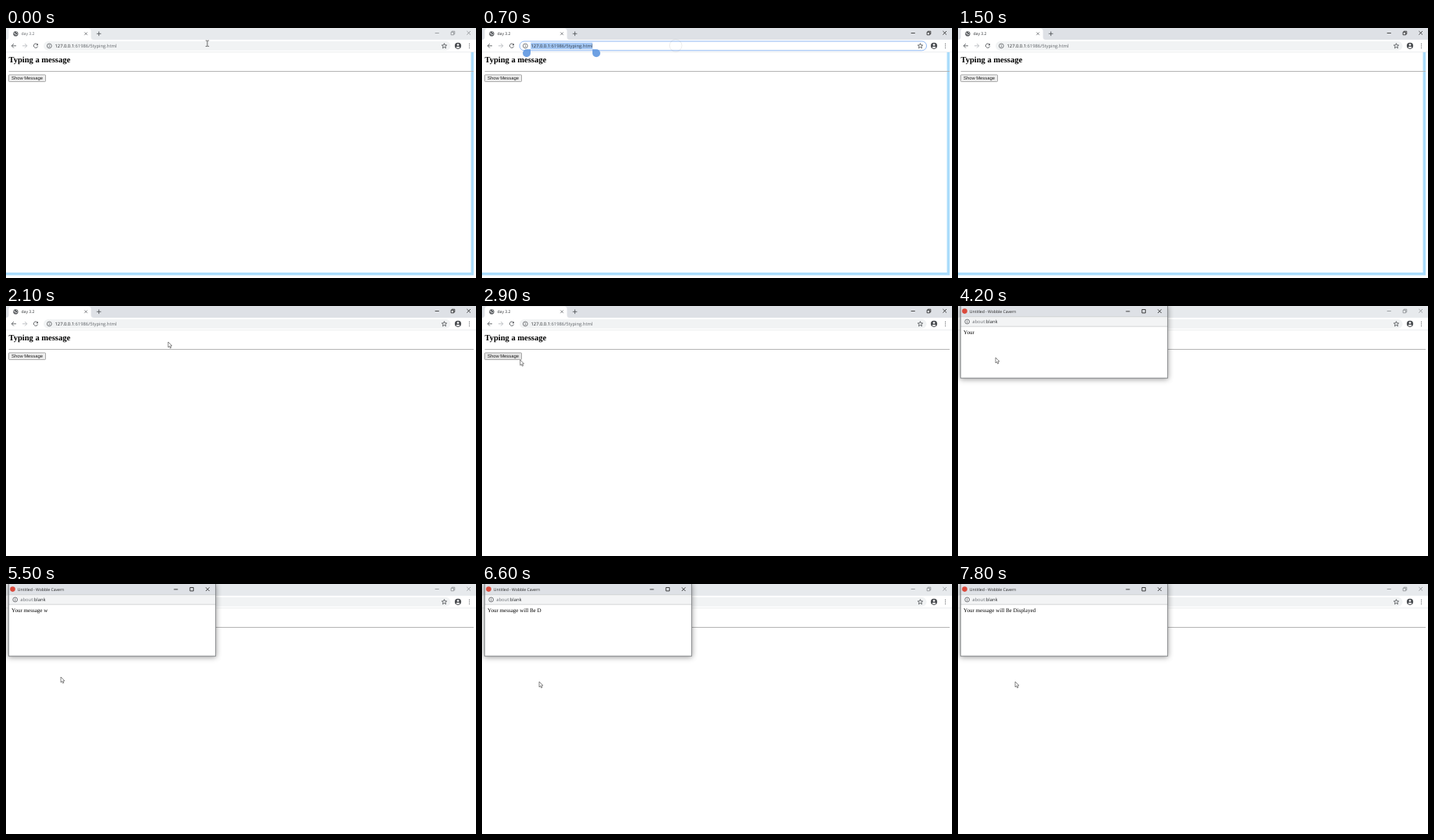
An HTML page for the animation above (8 s loop, 600 by 320 pixels).

```html
<!DOCTYPE html>
<html lang="en">
<head>
<meta charset="utf-8">
<title>Typing a message</title>
<style>
  html, body { margin: 0; width: 100%; height: 100%; overflow: hidden; background: #fff; }
  svg { display: block; width: 600px; height: 320px; text-rendering: geometricPrecision; }
  .ui { font-family: "Open Sans", "Noto Sans", sans-serif; font-size: 5.1px; }
  .url { font-size: 5.8px; }
  .serif { font-family: "Liberation Serif", serif; font-size: 7.05px; }
  .btn { font-family: "Liberation Sans", sans-serif; font-size: 5.85px; }
  .line { fill: none; stroke: #505357; stroke-width: .85; }
  #popup { transform-box: view-box; transform-origin: 135.5px 46px; filter: drop-shadow(0 1.5px 3.5px rgba(0,0,0,.42)); }
</style>
</head>
<body>
<svg viewBox="0 0 600 320">
  <defs>
    <g id="info" class="line">
      <circle r="2.9" stroke-width=".75"/>
      <path d="M0-.4V1.6M0-1.6V-.9" stroke-width=".8"/>
    </g>
    <path id="cross" d="M-2.3-2.3 2.3 2.3M2.3-2.3-2.3 2.3"/>
  </defs>

  <rect width="600" height="320" fill="#fff"/>
  <rect id="strip" width="600" height="15"/>
  <path d="M0 15Q3.5 15 3.5 11.5V4Q3.5 .5 7 .5H105Q108.5 .5 108.5 4V11.5Q108.5 15 112 15Z" fill="#fff"/>
  <circle cx="12.4" cy="7.4" r="3.1" fill="#505357"/>
  <path d="M10 6.4 12 7.2 11.8 9.2M12.900 5.200 14.400 6.400M13 8.900 14.500 7.900" fill="none" stroke="#fff" stroke-width=".9"/>
  <text id="tab" class="ui" x="19.5" y="9.3">day 3.2</text>
  <use href="#cross" class="line" transform="translate(102 7.3) scale(.8)"/>
  <path class="line" d="M115.8 7.3H121.4M118.6 4.5V10.1"/>
  <g id="controls" fill="none" stroke-width=".8">
    <path d="M547.7 6.5H552.800M568.1 5.3H571.600V8.800H568.100ZM569.100 5.300V4.200H572.800V7.800H571.600"/>
    <use href="#cross" x="590.7" y="6.3"/>
  </g>

  <path d="M0 30.8H600" stroke="#e3e5e8" stroke-width=".7"/>
  <g class="line">
    <path d="M13 22.8H7.3M9.9 20.1 7.2 22.8 9.9 25.5"/>
    <path d="M21 22.8H26.7M24.1 20.1 26.8 22.8 24.1 25.5" stroke="#b4b7bb"/>
    <path d="M40.3 21.2A2.7 2.7 0 1 0 40.6 23.5"/>
    <path d="M40.9 19.7V22.2H38.4Z" fill="#505357" stroke="none"/>
  </g>
  <rect id="omnibox" x="48" y="17" width="519.5" height="11.8" rx="5.9"/>
  <rect id="selection" x="62.3" y="18.7" width="78.8" height="8.6" fill="#a3c7f5"/>
  <use href="#info" x="55.3" y="22.9"/>
  <text class="ui url" x="62.5" y="25" fill="#25282b">127.0.0.1<tspan id="path">:61986/5typing.html</tspan></text>
  <path class="line" stroke-width=".7" d="M559.5 19.7 560.4 21.9 562.7 22 560.9 23.5 561.5 25.8 559.5 24.5 557.5 25.8 558.1 23.5 556.3 22 558.6 21.9Z"/>
  <circle cx="577" cy="22.8" r="4.1" fill="#4a4d51"/>
  <circle cx="577" cy="21.5" r="1.3" fill="#fff"/>
  <path d="M574.4 24.9Q577 22.5 579.6 24.9Q577 27.2 574.4 24.9Z" fill="#fff"/>
  <path d="M591.5 20.3V25.6" stroke="#4a4d51" stroke-width="1.2" stroke-linecap="round" stroke-dasharray="0 2.6"/>

  <text class="serif" x="3.5" y="44.2" style="font-size:10.5px;font-weight:bold">Typing a message</text>
  <path id="frame" d="M0 314.8H595.3V31" fill="none" stroke="#aadcfb" stroke-width="3.5"/>
  <path d="M3.5 55.5H597" stroke="#b4b4b4"/>
  <rect id="button" x="3.5" y="59.9" width="47" height="8.7" rx=".8" stroke="#858585" stroke-width=".7"/>
  <text class="btn" x="7" y="66.4" fill="#1c1c1c">Show Message</text>
  <circle id="dot" cx="45.7" cy="65.2" r="1.2" fill="#c4473e"/>

  <g id="handles" fill="#5e97e0" fill-opacity=".9">
    <path d="M62 27.3V32.3A5 5 0 1 1 57 27.3Z"/>
    <path d="M141 27.3V32.3A5 5 0 1 0 146 27.3Z"/>
  </g>
  <circle id="tap" cx="247.3" cy="22.5" r="7.8" fill="none" stroke="#8a8f96"/>

  <g id="popup">
    <rect x="3" y="-.5" width="265" height="92.8" fill="#fff"/>
    <rect x="3" width="265" height="13.7" fill="#dee1e6"/>
    <rect x="3" y="13.7" width="265" height="12.3" fill="#f3f4f5"/>
    <path d="M3 13.7H268M3 26.2H268" stroke="#b9bcc0" stroke-width=".6"/>
    <circle cx="8.5" cy="6.6" r="3.3" fill="#db4a3c"/>
    <text class="ui" x="14.8" y="8.6" fill="#222">Untitled - Wobble Cavern</text>
    <g fill="none" stroke="#222" stroke-width=".85">
      <path d="M214.3 6.9H219.4M234.9 4.5H239.3V8.9H234.9Z"/>
      <use href="#cross" x="257.4" y="6.7"/>
    </g>
    <use href="#info" x="11.7" y="20"/>
    <text class="ui url" x="18.3" y="22" fill="#6b6f74">about:<tspan fill="#25282b">blank</tspan></text>
    <text id="message" class="serif" x="7" y="36.1"></text>
    <rect x="3.3" y="-.5" width="264.4" height="92.7" fill="none" stroke="#6f7276" stroke-width=".8"/>
  </g>

  <path id="ibeam" d="M254.8 16.1H256.5L257 16.6 257.5 16.1H259.2M257 16.6V22.9M254.8 23.4H256.5L257 22.9 257.5 23.4H259.2" fill="none" stroke="#444" stroke-width=".8"/>
  <path id="arrow" d="M0 0V6.9L1.5 5.5 2.6 8 3.8 7.5 2.8 5H4.8Z" fill="#fff" stroke="#444" stroke-width=".65"/>
</svg>
<script>
const LOOP = 8000, STEP = 100;
const TEXT = "Your message will Be Displayed";
// When each letter lands, in steps of 100 ms.
const KEYS = [36, 37, 39, 40, 41, 43, 44, 46, 48, 49, 51, 53, 54, 55, 57,
              58, 60, 61, 63, 64, 65, 66, 68, 70, 71, 72, 74, 76, 77, 78];
// [ms, x, y] of the pointer tip
const POINTER = [[2100, 207, 46], [2500, 105, 65], [2800, 51, 71], [3000, 46.5, 67],
                 [3200, 46.5, 65], [4000, 46.5, 65], [4200, 48, 66], [4600, 69, 119],
                 [5000, 69, 119], [5100, 70, 119], [5700, 70, 119], [6500, 73, 125]];
// [ms, opacity, scale]
const OPENING = [[3500, 0, .95], [3600, .11, .957], [3700, .65, .985], [3800, 1, 1]];

const el = {};
document.querySelectorAll("svg [id]").forEach(n => el[n.id] = n);
const set = (id, attrs) => { for (const k in attrs) el[id].setAttribute(k, attrs[k]); };
const show = (id, on) => set(id, { visibility: on ? "visible" : "hidden" });

function sample(track, t) {
  const i = track.findIndex(k => k[0] > t);
  if (i === 0) return track[0].slice(1);
  if (i < 0) return track[track.length - 1].slice(1);
  const a = track[i - 1], b = track[i], p = (t - a[0]) / (b[0] - a[0]);
  return a.slice(1).map((v, j) => v + (b[j + 1] - v) * p);
}

function render(t) {
  const within = (a, b) => t >= a && t < b;
  const active = within(400, 3600), focus = within(700, 1500);

  set("strip", { fill: active ? "#dee1e6" : "#e7eaed" });
  set("controls", { stroke: active ? "#222" : "#8b8e92" });
  set("tab", { fill: t < 400 ? "#62666a" : "#303336" });
  set("omnibox", { fill: focus ? "#fff" : "#f1f3f4", stroke: focus ? "#8fb8f3" : "none" });
  set("path", { fill: focus ? "#35404d" : "#5f6368" });
  show("selection", focus);
  show("handles", focus);
  set("tap", { opacity: within(700, 1000) ? .17 * (1 - (t - 700) / 300) : 0 });
  show("frame", t < 1600);
  set("button", { fill: within(2900, 3400) ? "#e5e5e5" : "#efefef" });
  show("dot", within(3600, 3700));

  const [opacity, scale] = sample(OPENING, t);
  set("popup", { opacity });
  el.popup.style.transform = `scale(${scale})`;
  el.message.textContent = TEXT.slice(0, KEYS.filter(k => k * STEP <= t).length);

  show("ibeam", t < 400 || within(1700, 2100));
  show("arrow", t >= 2100);
  set("arrow", { transform: `translate(${sample(POINTER, t)})` });
}

let start, last;
function tick(now) {
  start ??= now;
  const t = Math.floor(((now - start) % LOOP) / STEP) * STEP;
  if (t !== last) render(last = t);
  requestAnimationFrame(tick);
}
render(0);
requestAnimationFrame(tick);
</script>
</body>
</html>
```
